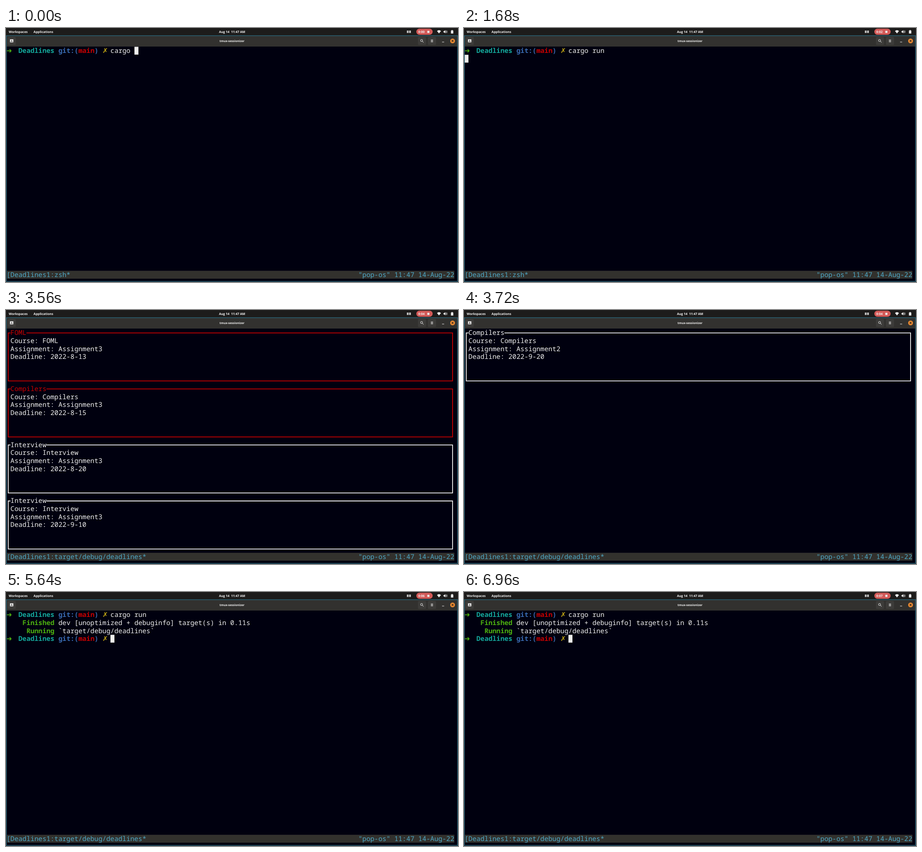
Animation of 998x561 px, one loop 7080 ms. Source, as an HTML page:

```html
<!DOCTYPE html>
<html lang="en">
<head>
<meta charset="utf-8">
<title>Deadlines in the terminal</title>
<style>
  html, body { margin: 0; width: 100%; height: 100%; overflow: hidden; background: #00000f; }
  svg { display: block; width: 998px; height: 561px; }
  text { white-space: pre; text-rendering: geometricPrecision; }
  .mono { font: 14.717px "Noto Sans Mono", "DejaVu Sans Mono", monospace; fill: #eeeeec; }
  .mono .sym { font-family: "DejaVu Sans", sans-serif; }
  .mono .bold { font-weight: 700; }
  .mono .green { fill: #4cb010; }
  .mono .cyan { fill: #14a89c; }
  .mono .blue { fill: #396bb2; }
  .mono .red { fill: #c80000; }
  .mono .yellow { fill: #c4a814; }
  .mono .status { fill: #4fa8c6; }
  .mono .frame { fill: none; stroke: #eeeeec; stroke-width: 1.8; }
  .mono .frame.red { fill: none; stroke: #c80000; }
  .ui { font: 700 7px "Open Sans", "Noto Sans", sans-serif; fill: #f2f2f2; }
  .title { font-size: 6.5px; }
  .btn { fill: #3d3c3a; }
  .icon { fill: #eeeeee; }
  .line { fill: none; stroke: #eeeeee; stroke-width: 1; }
</style>
</head>
<body>
<svg viewBox="0 0 998 561">
  <rect width="998" height="561" fill="#00000f"/>

  <!-- desktop panel -->
  <rect width="998" height="17" fill="#1d1c1b"/>
  <g class="ui">
    <text x="6" y="10.7">Workspaces</text>
    <text x="60.8" y="10.7">Applications</text>
    <text x="499.2" y="10.7" text-anchor="middle">Aug 14&#160; 11:47 AM</text>
  </g>
  <path class="icon" d="M885 6h4v2h-4zM885 8.8h4v2h-4zM890 6h4v2h-4zM890 8.8h4v2h-4z"/>
  <rect x="906" y="1.6" width="36" height="13.4" rx="6.7" fill="#d35a58"/>
  <text id="timer" class="ui" x="910.2" y="10.8"></text>
  <rect class="icon" x="930.3" y="6.2" width="4.6" height="4.6"/>
  <path class="icon" d="M951.6 6.8Q956 2.8 960.4 6.8L956 12z"/>
  <path class="icon" d="M966 6.8h1.8l2.4-2.3v7.6l-2.4-2.3H966z"/>
  <path class="line" d="M971.3 6.6q1.2 1.7 0 3.4M972.8 5.3q2.4 3 0 6"/>
  <path class="icon" d="M984 4.6h2v.9h1.6v6.8h-5.2V5.5h1.6z"/>

  <!-- window title bar -->
  <rect x="1" y="17" width="996" height="24" fill="#32312f"/>
  <rect class="btn" x="3.5" y="20" width="18" height="17.5" rx="2"/>
  <rect class="btn" x="909.5" y="20" width="18" height="17.5" rx="2"/>
  <rect class="btn" x="931.5" y="20" width="18" height="17.5" rx="2"/>
  <path class="icon" d="M8.8 25h7.4v6.6H8.8z"/>
  <path d="M10.3 29.3h4.4M12.5 26.3v3" stroke="#32312f"/>
  <circle class="line" cx="917.6" cy="27.6" r="2.3"/>
  <path class="line" d="M919.3 29.3l2.8 2.8M938 26.3h5M938 28.5h5M938 30.7h5M962.8 31h4.6"/>
  <text class="ui title" x="499" y="30.7" text-anchor="middle">tmux-sessionizer</text>
  <circle cx="986" cy="28.5" r="5.3" fill="#ec8b32"/>
  <path d="M984 26.5l4 4M988 26.5l-4 4" stroke="#33261b" stroke-width="1.1"/>

  <rect x="2" y="536.2" width="988" height="17.5" fill="#32312d"/>
  <g id="screen" class="mono"></g>
  <rect id="cursor" width="8.83" height="17.3" fill="#eeeeec"/>
  <g id="status" class="mono"></g>
  <rect x=".9" y="17" width="996.2" height="542.6" fill="none" stroke="#2b5f70" stroke-width="1.6"/>
</svg>
<script>
const LOOP = 7080, CW = 8.83, RH = 17.67, LEFT = 1, TOP = 41.5;
const $ = id => document.getElementById(id);
const colX = c => LEFT + c * CW;
const rowY = r => TOP + r * RH;

const put = (row, col, str, cls = '') =>
  `<text class="${cls}" x="${colX(col)}" y="${rowY(row) + 13.7}">${str}</text>`;

const prompt = (row, command = '') =>
  put(row, 0, '➜', 'sym green') +
  put(row, 3, 'Deadlines', 'bold cyan') +
  put(row, 13, 'git:(', 'bold blue') +
  put(row, 18, 'main', 'bold red') +
  put(row, 22, ')', 'bold blue') +
  put(row, 24, '✗', 'sym yellow') +
  put(row, 26, command);

// A framed panel whose top edge is interrupted by its title.
function panel(row, rows, title, cls = '') {
  const x1 = colX(.45), x2 = colX(111.55);
  const y1 = rowY(row + .52), y2 = rowY(row + rows - .48);
  const gap = colX(1 + title.length);
  return `<path class="frame ${cls}" d="M${colX(1)} ${y1}H${x1}V${y2}H${x2}V${y1}H${gap}"/>` +
    put(row, 1, title, cls);
}

const card = (i, course, task, date, cls) =>
  panel(i * 7, 7, course, cls) +
  put(i * 7 + 1, 1, 'Course: ' + course) +
  put(i * 7 + 2, 1, 'Assignment: Assignment' + task) +
  put(i * 7 + 3, 1, 'Deadline: 2022-' + date);

const pageOne =
  card(0, 'FOML', 3, '8-13', 'red') +
  card(1, 'Compilers', 3, '8-15', 'red') +
  card(2, 'Interview', 3, '8-20') +
  card(3, 'Interview', 3, '9-10');
const pageTwo = card(0, 'Compilers', 2, '9-20');
const endPage = panel(0, 28, 'End') + put(3, 1, 'Press q to exit the application.');
const shellAfter =
  prompt(0, 'cargo run') +
  put(1, 4, 'Finished', 'bold green') +
  put(1, 13, 'dev [unoptimized + debuginfo] target(s) in 0.11s') +
  put(2, 5, 'Running', 'bold green') +
  put(2, 13, '`target/debug/deadlines`') +
  prompt(3);

// Each track lists [start time, value].
const screens = [
  [0, prompt(0, 'cargo')], [360, prompt(0, 'cargo r')], [760, prompt(0, 'cargo ru')],
  [1000, prompt(0, 'cargo run')], [1720, pageOne], [3720, pageTwo],
  [4880, endPage], [5600, shellAfter]
];
const cursors = [
  [0, [0, 32]], [360, [0, 33]], [760, [0, 34]], [1000, [0, 35]], [1520, [1, 0]],
  [1720, null], [5600, [3, 26]], [6200, null], [6800, [3, 26]]
];
const jobs = [[0, 'zsh'], [1720, 'cargo'], [3200, 'target/debug/deadlines']];
const ticks = [560, 1560, 2560, 3560, 4560, 5560, 6600];

const at = (track, t) => track.filter(e => e[0] <= t).pop()[1];

const shown = {};
function update(id, html) {
  if (shown[id] === html) return;
  shown[id] = html;
  $(id).innerHTML = html;
}

function draw() {
  const t = performance.now() % LOOP;
  update('screen', at(screens, t));
  update('status',
    put(28, 0, `[Deadlines1:${at(jobs, t)}*`, 'status') +
    put(28, 88, '"pop-os" 11:47 14-Aug-22', 'status'));
  update('timer', '0:0' + ticks.filter(s => s <= t).length);

  const pos = at(cursors, t), cursor = $('cursor');
  cursor.style.visibility = pos ? 'visible' : 'hidden';
  if (pos) {
    cursor.setAttribute('x', colX(pos[1]));
    cursor.setAttribute('y', rowY(pos[0]));
  }
  requestAnimationFrame(draw);
}
draw();
</script>
</body>
</html>
```
